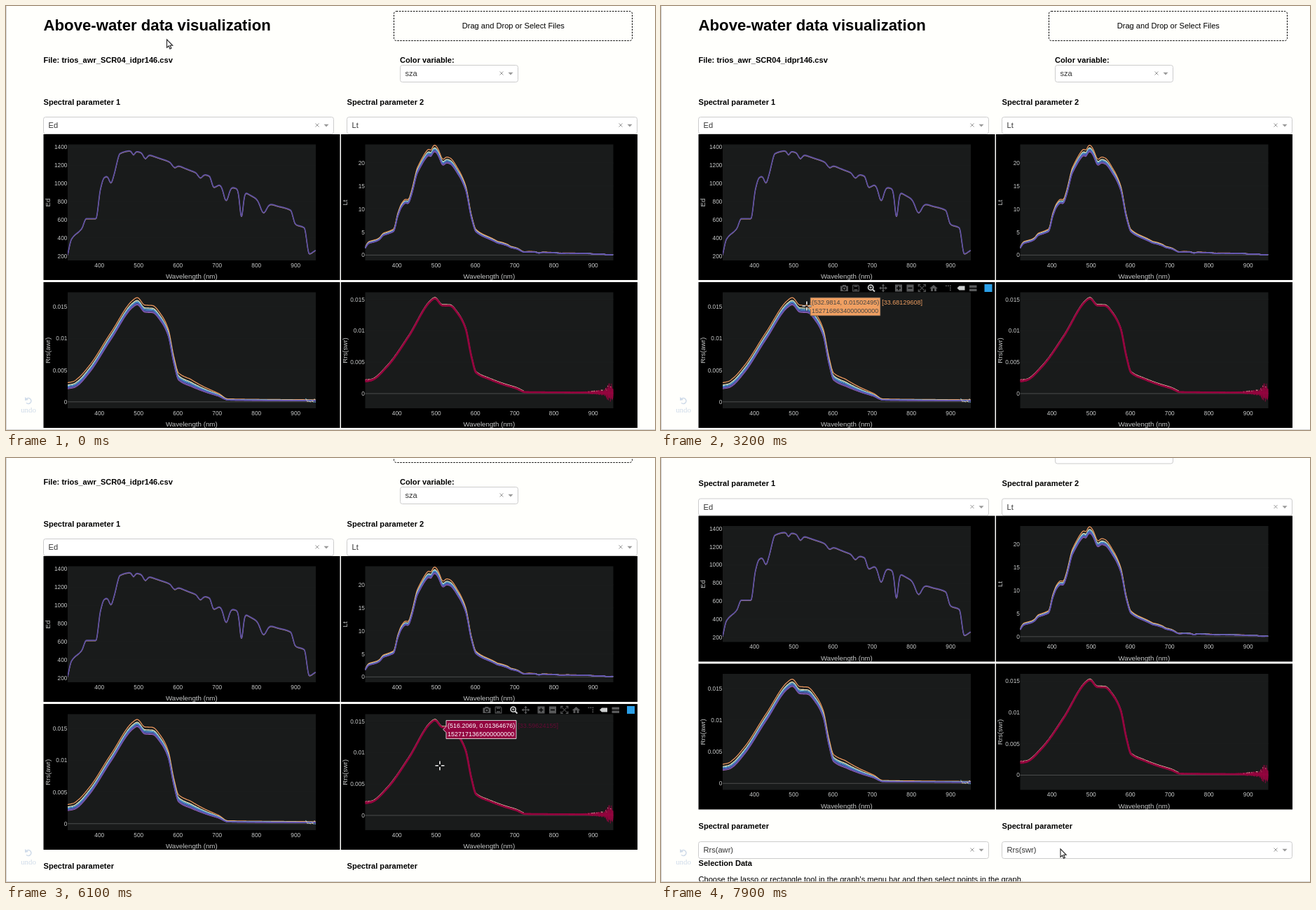
These frames come from a looping animation (926x605 px, 8000 ms). An HTML page with a canvas:

```html
<!DOCTYPE html>
<html lang="en">
<head>
<meta charset="utf-8">
<title>Above-water data visualization</title>
<style>
html, body { margin: 0; width: 100%; height: 100%; overflow: hidden; background: #fffffc; }
canvas { display: block; }
</style>
</head>
<body>
<canvas id="stage" width="926" height="605"></canvas>
<script>
const W = 926, H = 605, LOOP = 8000, STEP = 100, BG = '#fffffc';
const SANS = '"Liberation Sans", Arial, sans-serif';
const DX = 424.5, DY = 211;          // offsets between chart columns and rows

const stage = document.getElementById('stage').getContext('2d');
const page = document.createElement('canvas');
page.width = W;
page.height = H;
const pageCtx = page.getContext('2d');
let g = stage;

// ---- drawing helpers ----

// y is the middle of the capitals
function text(s, x, y, size = 11.1, color = '#000', align = 'left', weight = '') {
  g.font = `${weight} ${size}px ${SANS}`;
  g.fillStyle = color;
  g.textAlign = align;
  g.fillText(s, x, y + size * 0.36);
}
const bold = (s, x, y, size) => text(s, x, y, size, '#000', 'left', 'bold');

function rect(x, y, w, h, color) {
  g.fillStyle = color;
  g.fillRect(x, y, w, h);
}

function trace(p) {
  for (let i = 0; i < p.length; i += 2) g[i ? 'lineTo' : 'moveTo'](p[i], p[i + 1]);
}

function lines(color, width, ...paths) {
  g.strokeStyle = color;
  g.lineWidth = width;
  g.beginPath();
  paths.forEach(trace);
  g.stroke();
}

function poly(fill, p, stroke, width) {
  g.beginPath();
  trace(p);
  g.closePath();
  g.fillStyle = fill;
  g.fill();
  if (!stroke) return;
  g.strokeStyle = stroke;
  g.lineWidth = width;
  g.stroke();
}

function arc(x, y, r, from, to, color, width) {
  g.strokeStyle = color;
  g.lineWidth = width;
  g.beginPath();
  g.arc(x, y, r, from, to);
  g.stroke();
}

function roundBox(x, y, w, h, r, fill, stroke) {
  g.beginPath();
  g.roundRect(x, y, w, h, r);
  g.fillStyle = fill;
  g.fill();
  g.strokeStyle = stroke;
  g.lineWidth = 1;
  g.stroke();
}

function dropdown(x, y, w, value) {
  roundBox(x + 0.5, y + 0.5, w - 1, 24, 3, '#fff', '#ccc');
  text(value, x + 7.5, y + 12.3, 11.1, '#333');
  const cx = x + w - 24, cy = y + 12;
  lines('#999', 1, [cx - 2.5, cy - 2.5, cx + 2.5, cy + 2.5], [cx + 2.5, cy - 2.5, cx - 2.5, cy + 2.5]);
  poly('#999', [cx + 9.5, cy - 1.2, cx + 16.5, cy - 1.2, cx + 13, cy + 2.5]);
}

// ---- spectra ----

// monotone cubic through flat x,y points
function spline(p) {
  const n = p.length / 2, X = i => p[2 * i], Y = i => p[2 * i + 1];
  const d = i => (Y(i + 1) - Y(i)) / (X(i + 1) - X(i));
  const slope = i => {
    const a = d(Math.max(0, i - 1)), b = d(Math.min(n - 2, i));
    return a * b > 0 ? 2 * a * b / (a + b) : 0;
  };
  return x => {
    let i = 0;
    while (i < n - 2 && x > X(i + 1)) i++;
    const h = X(i + 1) - X(i), u = (x - X(i)) / h, v = 1 - u;
    return Y(i) * (1 + 2 * u) * v * v + Y(i + 1) * u * u * (3 - 2 * u)
      + h * u * v * (slope(i) * v - slope(i + 1) * u);
  };
}
const bell = (w, mid, width) => Math.exp(-(((w - mid) / width) ** 2));

const NM = Array.from({ length: 633 }, (_, i) => 319 + i);
const sunlight = spline([
  319, 212, 329, 385, 355, 502, 367, 612, 391, 612, 403, 940, 412, 1060, 437, 1125, 453, 1330, 478, 1358,
  562, 1264, 640, 1130, 680, 1080, 692, 958, 708, 985, 750, 943, 805, 825, 850, 755, 887, 705, 900, 550,
  922, 510, 935, 225, 951, 262
]);
// absorption dips: wavelength, depth, width
const DIPS = [[430, 95, 7], [487, 40, 5], [517, 55, 7], [591, 40, 8], [657, 50, 8], [723, 165, 9], [762, 285, 6], [818, 125, 11]];
const reflectance = spline([
  319, 20, 335, 21.5, 375, 43, 430, 91, 484, 146, 497, 151.5, 516, 140.5, 535, 140, 557, 126,
  575, 104, 590, 59, 602, 33.5, 636, 23, 672, 14.5, 704, 8.4, 728, 2.5, 951, 1.5
]);

const ed = NM.map(w => DIPS.reduce((v, [mid, depth, width]) => v - depth * bell(w, mid, width), sunlight(w)));
const swr = NM.map(w => reflectance(w) / 1e4);
const awr = swr.map((v, i) => v + 0.0007 * bell(NM[i], 425, 50));
const skyGlint = w => 0.0037 * (350 / w) ** 2.8;
const lt = ed.map((v, i) => v * (swr[i] + skyGlint(NM[i])));

const nmX = (w, col) => 133.2 + col * DX + (w - 400) * 0.56;
const AXES = {
  ed: v => 201.2 + (1400 - v) * 0.1295,
  lt: v => 355.4 - v * 6.57,
  awr: v => 564.8 - v * 9040,
  swr: v => 553 - v * 8960
};

function plot(data, axis, col, color, width, dy = 0) {
  g.lineJoin = 'round';
  lines(color, width, data.flatMap((v, i) => [nmX(NM[i], col), axis(v) + dy]));
}

// a bundle of casts: height within the bundle, colour, line width
const CASTS = [
  [1, '#e8955c', 1.3], [0.64, '#f1e3bb', 1.2], [0.53, '#8cc8c6', 1.1], [0.43, '#4f93d0', 1.2],
  [0.32, '#4573c0', 1.3], [0.05, '#a060b0', 1.1], [0.16, '#6454b0', 1.7]
];
function bundle(data, axis, col, spread) {
  for (const [f, color, width] of CASTS) plot(data.map(v => v + f * spread(v)), axis, col, color, width);
}

let seed;
const rnd = () => (seed = seed * 16807 % 2147483647) / 2147483647;

function drawEd() {
  plot(ed, AXES.ed, 0, '#dcae98', 1, 0.8);
  plot(ed, AXES.ed, 0, '#5f51a3', 1.7);
}
function drawLt() {
  bundle(lt, AXES.lt, 1, v => Math.min(0.2 * v, 0.3 + 0.055 * v));
}
function drawAwr() {
  bundle(awr, AXES.awr, 0, v => Math.min(0.0012, 0.0001 + 0.45 * v));
  for (let w = 925; w < 951; w += 2)
    rect(nmX(w, 0), 562.4 + (rnd() - 0.5) * 5, 1.3, 1.3, rnd() < 0.6 ? '#f1e3bb' : '#5aa3d6');
}
function drawSwr() {
  plot(swr.slice(0, 405), AXES.swr, 1, '#f0c9ae', 1.2, -1.4);
  plot(swr, AXES.swr, 1, '#95053f', 2.8, 0.2);
  swr.forEach((v, i) => {
    const w = NM[i], x = nmX(w, 1), y = AXES.swr(v);
    const amp = 0.8 + 2 * bell(w, 319, 20) + 4 * bell(w, 945, 55) + 10 * bell(w, 942, 9);
    const up = amp * (0.4 + 0.6 * rnd()), down = amp * (0.4 + 0.6 * rnd());
    rect(x, y - up, 0.9, up + down, '#95053f');
    if (amp > 2 && rnd() < 0.25) rect(x, y - up, 1, 1, '#eccbb8');
  });
}

// ---- page ----

function chart(col, row, yTitle, ticks, axis, draw) {
  const ox = col * DX, oy = row * DY;
  const px = 88 + ox, py = 197.5 + oy, pw = 354, ph = 165.5;
  rect(53.5 + ox, 183 + oy, 423, 208, '#000');
  rect(px, py, pw, ph, '#191b1b');
  for (const v of ticks) {
    const y = axis(v);
    lines(v ? '#1b1d1d' : '#4a4c4c', 1, [px, y, px + pw, y]);
    text(String(v), px - 0.5, y, 8.33, '#c6c8c8', 'right');
  }
  for (let w = 400; w <= 900; w += 100) text(String(w), nmX(w, col), 370 + oy, 8.33, '#c6c8c8', 'center');
  text('Wavelength (nm)', 264.8 + ox, 386 + oy, 9.72, '#c6c8c8', 'center');
  g.save();
  g.translate(59.3 + ox, 280.5 + oy);
  g.rotate(-Math.PI / 2);
  text(yTitle, 0, 0, 9.72, '#c6c8c8', 'center');
  g.restore();
  g.save();
  g.beginPath();
  g.rect(px, py, pw, ph);
  g.clip();
  draw();
  g.restore();
}

function drawPage(scroll) {
  g = pageCtx;
  seed = 7;
  rect(0, 0, W, H, BG);
  g.save();
  g.translate(0, -scroll);

  bold('Above-water data visualization', 53.5, 27.3, 22.2);
  g.setLineDash([2.4, 1.6]);
  roundBox(553.5, 7.5, 340, 42, 3.5, BG, '#000');
  g.setLineDash([]);
  text('Drag and Drop or Select Files', 723.8, 28.3, 11.1, '#000', 'center');
  bold('File: trios_awr_SCR04_idpr146.csv', 53.5, 77.3);
  bold('Color variable:', 562, 77.3);
  dropdown(562, 84, 169, 'sza');
  bold('Spectral parameter 1', 53.5, 137);
  bold('Spectral parameter 2', 486.5, 137);
  dropdown(53, 158, 415, 'Ed');
  dropdown(486, 158, 415, 'Lt');

  const small = [0.015, 0.01, 0.005, 0];
  chart(0, 0, 'Ed', [1400, 1200, 1000, 800, 600, 400, 200], AXES.ed, drawEd);
  chart(1, 0, 'Lt', [20, 15, 10, 5, 0], AXES.lt, drawLt);
  chart(0, 1, 'Rrs(awr)', small, AXES.awr, drawAwr);
  chart(1, 1, 'Rrs(swr)', small, AXES.swr, drawSwr);

  bold('Spectral parameter', 53.5, 625.5);
  bold('Spectral parameter', 486.5, 625.5);
  dropdown(53, 647.5, 415, 'Rrs(awr)');
  dropdown(486, 647.5, 415, 'Rrs(swr)');
  bold('Selection Data', 53.5, 678.3);
  text("Choose the lasso or rectangle tool in the graph's menu bar and then select points in the graph.", 53.5, 701.7);
  g.restore();
  g = stage;
}

// ---- overlays ----

function modebar(ox, oy) {
  const off = '#58595a', dim = '#454647', on = '#cdcfcf';
  const at = (x, draw) => {
    g.save();
    g.translate(x + ox, 191.5 + oy);
    draw();
    g.restore();
  };
  const fourWays = draw => {
    for (let i = 0; i < 4; i++) {
      g.rotate(Math.PI / 2);
      draw();
    }
  };
  at(261.5, () => {
    rect(-5.5, -3, 11, 7.5, off);
    rect(-2.5, -4.5, 5, 2, off);
    arc(0, 0.7, 2.2, 0, 7, '#000', 1.2);
  });
  at(278, () => {
    lines(off, 1.1, [-4.3, -4.3, 3, -4.3, 4.4, -3, 4.4, 4.4, -4.3, 4.4, -4.3, -4.3]);
    rect(-2.5, -4, 5, 2.5, dim);
    rect(-2.5, 1.5, 5, 2.5, dim);
  });
  at(300, () => {
    arc(-0.8, -0.8, 3.6, 0, 7, on, 1.7);
    lines(on, 2, [2, 2, 5, 5]);
    lines(on, 1, [-2.6, -0.8, 1, -0.8], [-0.8, -2.6, -0.8, 1]);
  });
  at(317, () => {
    lines(off, 1.3, [-5, 0, 5, 0], [0, -5, 0, 5]);
    fourWays(() => poly(off, [5.8, 0, 3, -2.2, 3, 2.2]));
  });
  at(339, () => {
    rect(-5, -5, 10, 10, off);
    lines('#000', 1.6, [-3, 0, 3, 0], [0, -3, 0, 3]);
  });
  at(355.5, () => {
    rect(-5, -5, 10, 10, off);
    lines('#000', 1.6, [-3, 0, 3, 0]);
  });
  at(372.3, () => {
    lines(dim, 1.1, [-4, -4, 4, 4], [4, -4, -4, 4]);
    fourWays(() => lines(off, 1.2, [-5, -2, -5, -5, -2, -5]));
  });
  at(389, () => {
    poly(off, [0, -4.5, 5.8, 0.6, -5.8, 0.6]);
    rect(-4, 0, 3, 4.5, off);
    rect(1, 0, 3, 4.5, off);
  });
  at(410, () => {
    for (const x of [-4, -1, 2]) rect(x, -4, 1.8, 1.6, off);
    for (const y of [-1, 2]) rect(2, y, 1.6, 1.8, off);
  });
  at(428, () => poly(on, [-5.5, 0, -2.5, -3, 5.5, -3, 5.5, 3, -2.5, 3]));
  at(445, () => {
    rect(-5, -4, 10.5, 3.5, off);
    rect(-5, 1, 10.5, 3.5, off);
  });
  at(467, () => rect(-5.5, -5.5, 11, 11, '#2a9fe8'));
}

const style = (fill, ink, nameInk = fill) => ({ fill, ink, nameInk });
const RED = style('#da5648', '#444'), ORANGE = style('#f0a062', '#444'), CRIMSON = style('#92043f', '#fff', '#640a34');
// from, to, anchor x, y, two lines, name, style
const LABELS = [
  [1100, 1600, 198.8, 223, '(516.2545, 1,230.572)', '1527168621000000000', '[33.64875378]', RED],
  [1600, 2000, 219.5, 220, '(553.0317, 1,253.418)', '1527168621000000000', '[33.64875378]', RED],
  [2000, 2500, 236.6, 227, '(583.1206, 1,201.836)', '1527168621000000000', '[33.64875378]', RED],
  [3200, 4000, 208.8, 429, '(532.9814, 0.01502495)', '1527168634000000000', '[33.68129608]', ORANGE],
  [4900, 7400, 623.8, 430.5, '(516.2069, 0.01364676)', '1527171365000000000', '[33.59624155]', CRIMSON]
];

function hoverLabel([, , x, y, top, bottom, name, { fill, ink, nameInk }]) {
  const l = x + 4.2, r = l + 100, h = 13;
  poly(fill, [x, y, l, y - 4.2, l, y - h, r, y - h, r, y + h, l, y + h, l, y + 4.2], ink, 0.8);
  text(top, l + 2, y - 5.8, 9.03, ink);
  text(bottom, l + 2, y + 5.8, 9.03, ink);
  text(name, r + 2.3, y - 5.8, 9.03, nameInk);
}

function arrow(x, y) {
  g.save();
  g.translate(x + 0.5, y + 0.8);
  poly('#fff', [0, 0, 0, 11.6, 2.7, 9.2, 4.5, 13.4, 6.4, 12.5, 4.6, 8.5, 8.2, 8.5], '#222', 1.1);
  g.restore();
}

function cross(x, y) {
  const arms = [[x - 6.5, y, x - 2, y], [x + 2, y, x + 6.5, y], [x, y - 6.5, x, y - 2], [x, y + 2, x, y + 6.5]];
  lines('#000', 3, ...arms);
  lines('#fff', 1.6, ...arms);
}

function undoButton() {
  const color = '#cfdbe9';
  arc(32, 563.5, 3.9, -2.3, 2.4, color, 1.5);
  poly(color, [27, 558, 27, 563, 32, 562]);
  g.font = '10.8px "Liberation Serif", Times, serif';
  g.fillStyle = color;
  g.textAlign = 'center';
  g.fillText('undo', 32, 580);
}

// ---- motion ----

// each move: from, to, then where it ends
const POINTER = [
  [600, 1100, 197, 232], [1200, 1300, 199, 236], [1400, 1500, 199, 225], [1500, 2100, 234, 245],
  [2400, 2900, 232, 490], [2900, 3200, 208, 428], [3900, 4500, 554, 469], [4600, 4900, 619, 439],
  [7300, 7500, 583, 566], [7600, 7800, 569, 587], [7800, 7900, 569.5, 557]
];
const SCROLL = [[5800, 6500, 61.5], [6600, 7000, 100.5]];

const smooth = u => u * u * (3 - 2 * u);
const wheel = u => 1 - (1 - u) ** 2.15;
function follow(moves, t, ease, home) {
  return moves.reduce((pos, [from, to, ...end]) => {
    const k = ease(Math.max(0, Math.min(1, (t - from) / (to - from))));
    return pos.map((p, i) => p + (end[i] - p) * k);
  }, home);
}

let drawnScroll;
function frame() {
  const t = Math.floor((performance.now() - start) % LOOP / STEP) * STEP;
  const [scroll] = follow(SCROLL, t, wheel, [0]);
  const [x, y] = follow(POINTER, t, smooth, [229, 47]);
  if (scroll !== drawnScroll) drawPage(drawnScroll = scroll);
  g.drawImage(page, 0, 0);

  const col = x >= 477 ? 1 : 0, row = y + scroll >= 392.5 ? 1 : 0;
  const lx = x - col * DX, ly = y + scroll - row * DY;
  const inside = (l, top, r, bottom) => lx > l && lx < r && ly > top && ly < bottom;

  g.save();
  g.translate(0, -scroll);
  if (inside(53, 183, 477, 391)) modebar(col * DX, row * DY);
  const label = LABELS.find(([from, to]) => t >= from && t < to);
  if (label) hoverLabel(label);
  g.restore();

  undoButton();
  const hidden = t >= 7600 && t < 7800;
  if (!hidden) (inside(88, 197, 442, 363) ? cross : arrow)(x, y);
  rect(0, 0, 1, H, '#d4d4d2');
  rect(0, 604, W, 1, '#d4d4d2');
  requestAnimationFrame(frame);
}

const start = performance.now();
frame();
</script>
</body>
</html>
```
